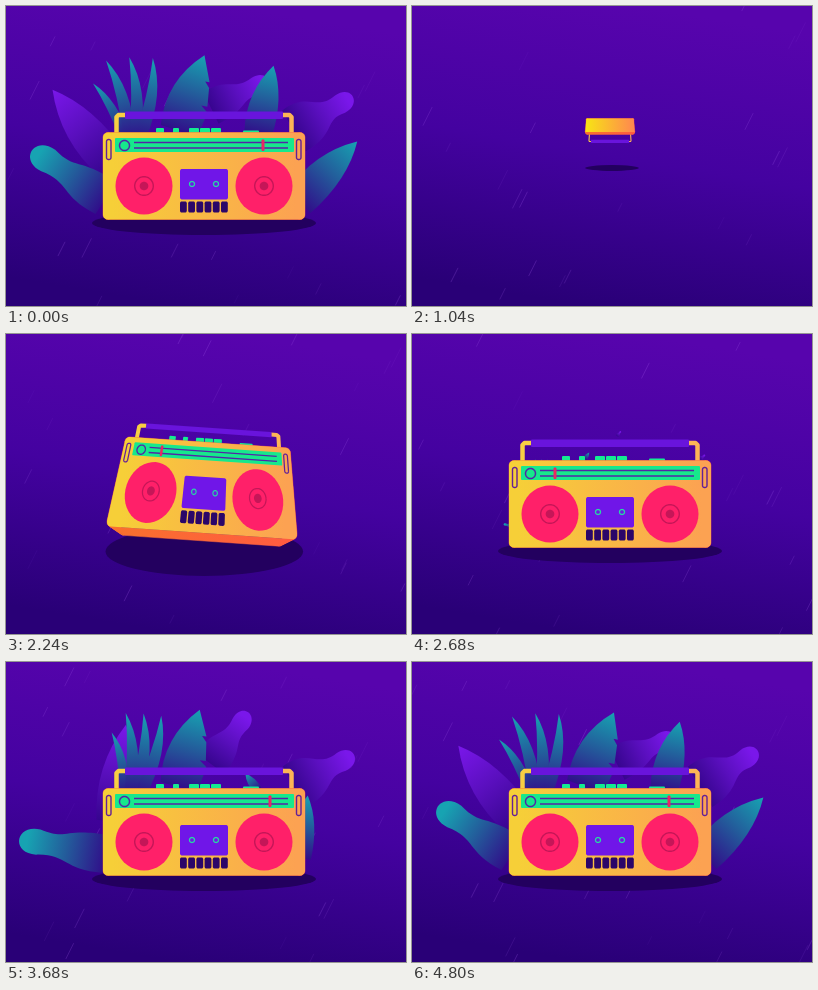
These frames come from a looping animation (400 by 300 pixels, 4840 ms). An HTML page with a canvas:

```html
<!DOCTYPE html>
<html lang="en">
<head>
<meta charset="utf-8">
<title>Boombox</title>
<style>
html, body { margin: 0; width: 100%; height: 100%; overflow: hidden; background: #4202a0; }
canvas { display: block; width: 400px; height: 300px; }
</style>
</head>
<body>
<canvas id="stage" width="400" height="300"></canvas>
<script>
const ctx = document.getElementById('stage').getContext('2d');
const LOOP = 4840, FOCAL = 200, HALF = 18, MID = { x: 198, y: 169.5 };
const TEAL = ['#17a3b2', '#235c9b', '#300f8a'];
const PURPLE = ['#7a17ea', '#5a0fbe', '#37058f'];
const { sin, cos, PI } = Math, TURN = PI * 2;

function ease(t, from, to) {
  const u = Math.min(1, Math.max(0, (t - from) / (to - from)));
  return u * u * (3 - 2 * u);
}
const swing = (t, period) => .5 - .5 * cos(TURN * (t - 3680) / period);
const slowSway = t => swing(t, t < 3680 ? 1120 : 2240);
const quickSway = t => swing(t, 1280);

// Angles are degrees clockwise from upright; lean is added at full sway.
const plants = [
  { kind: 'blob', colors: PURPLE, width: .3, x: 205, y: 102, length: 58, angle: 36, lean: 28 },
  { kind: 'blob', colors: PURPLE, width: .38, x: 288, y: 125, length: 62, angle: 62, lean: -27, sway: quickSway },
  { kind: 'leaf', colors: PURPLE, width: .18, x: 108, y: 160, length: 98, angle: 7, lean: -60 + 14 },
  { kind: 'blob', colors: TEAL, width: .24, x: 100, y: 192, length: 80, angle: -80, lean: 23 }
];
plants[2].lean = -60;
plants[2].lean = -46;
for (let i = 0; i < 4; i++) {
  plants.push({ kind: 'leaf', colors: TEAL, width: .07, bend: .12, x: 119 + 5 * i, y: 133,
    length: i ? 82 : 64, angle: -12 + 9 * i, lean: -18 + 4 * i });
}
plants.push(
  { kind: 'torn', colors: TEAL, width: .24, x: 173, y: 125, length: 80, angle: 15, lean: 43, sway: quickSway },
  { kind: 'leaf', colors: TEAL, width: .2, x: 252, y: 128, length: 70, angle: -37, lean: 50, shrink: .7 },
  { kind: 'leaf', colors: TEAL, width: .19, x: 293, y: 196, length: 84, angle: 8, lean: 36, shrink: .25 }
);

function drawPlant(plant, t) {
  const { kind, colors, width: w, x, y, bend = 0, shrink = 0, sway = slowSway } = plant;
  const s = sway(t < 1000 ? t + LOOP : t);
  const grown = 1 - ease(t, 0, 520) + ease(t, 2600, 3020);
  const length = plant.length * grown * (1 - shrink * (1 - s) ** 2);
  if (length < 2) return;
  const angle = (plant.angle + plant.lean * s) * PI / 180;
  const dx = length * sin(angle), dy = -length * cos(angle);
  const at = (u, v) => [x + dx * u - dy * v, y + dy * u + dx * v];

  const fill = ctx.createLinearGradient(x + dx, y + dy, x, y);
  colors.forEach((c, i) => fill.addColorStop(i / 2, c));
  ctx.fillStyle = fill;
  ctx.beginPath();
  ctx.moveTo(...at(0, -w));
  if (kind === 'blob') {
    const head = .16, neck = .08;
    ctx.bezierCurveTo(...at(.5, -w * 1.2), ...at(.48, -neck), ...at(.86, -head));
    ctx.bezierCurveTo(...at(1.18, -head * 1.2), ...at(1.18, head * 1.1), ...at(.86, head));
    ctx.bezierCurveTo(...at(.5, neck), ...at(.58, w), ...at(0, w));
  } else {
    ctx.quadraticCurveTo(...at(.55, bend - w * 1.5), ...at(1, 0));
    if (kind === 'torn') {
      for (const u of [.7, .4]) {
        const edge = w * (1.4 - u);
        ctx.lineTo(...at(u, edge));
        ctx.lineTo(...at(u - .01, edge * .68));
        ctx.lineTo(...at(u - .07, edge * 1.1));
      }
      ctx.lineTo(...at(0, w));
    } else ctx.quadraticCurveTo(...at(.6, bend + w * 1.25), ...at(0, w));
  }
  ctx.fill();
}

let seed = 41;
const random = () => (seed = seed * 16807 % 2147483647) / 2147483647;
const drops = Array.from({ length: 40 }, () => ({
  x: random() * 550, phase: random(), cycles: 4 + Math.floor(random() * 3),
  length: 8 + random() * 12, alpha: .06 + random() * .24
}));

function drawRain(t) {
  ctx.strokeStyle = '#ac66ef';
  ctx.lineWidth = .8;
  for (const d of drops) {
    const y = (d.phase + d.cycles * t / LOOP) % 1 * 350 - 25;
    const x = d.x - y * .5;
    ctx.globalAlpha = d.alpha;
    ctx.beginPath();
    ctx.moveTo(x, y);
    ctx.lineTo(x - d.length * .5, y + d.length);
    ctx.stroke();
  }
  ctx.globalAlpha = 1;
}

function arc(x, y, r, from = 0, to = TURN, steps = 40) {
  return Array.from({ length: steps + 1 }, (_, i) => {
    const a = from + (to - from) * i / steps;
    return [x + r * cos(a), y + r * sin(a)];
  });
}
function rounded(x0, y0, x1, y1, r) {
  const q = PI / 2;
  return [[x1 - r, y1 - r], [x0 + r, y1 - r], [x0 + r, y0 + r], [x1 - r, y0 + r]]
    .flatMap(([x, y], i) => arc(x, y, r, i * q, (i + 1) * q, 5));
}

// The box tumbles into the distance and back, with a kick near the ground.
function poseAt(t) {
  const away = ease(t, 400, 1040) - ease(t, 1040, 2640);
  const kick = 4.2 * away * (1 - away) ** 4;
  return {
    away, kick,
    scale: 1 - .76 * away,
    y: MID.y - 49 * away - 10 * sin(PI * away),
    tilt: (t < 1040 ? 360 - 155 * away : 205 * away ** 1.2) * PI / 180,
    roll: 12 * kick * PI / 180,
    stretch: 1 - .28 * away + kick,
    handle: 18 + 28 * away ** 2 - 13 * kick
  };
}

function projector({ kick, scale, y: cy, tilt, roll, stretch }) {
  const focal = FOCAL / scale, cx = MID.x + 2 * scale * kick;
  return (x, y, z) => {
    x -= MID.x;
    y -= MID.y;
    const depth = y * sin(tilt) + z * cos(tilt);
    const k = scale * (focal - HALF) / (focal - depth);
    const px = x * k, py = (y * cos(tilt) - z * sin(tilt)) * k * stretch;
    return [cx + px * cos(roll) - py * sin(roll), cy + px * sin(roll) + py * cos(roll)];
  };
}

function drawShadow({ away, kick, scale }) {
  ctx.fillStyle = '#23005f';
  ctx.beginPath();
  ctx.ellipse(MID.x + 2 * away, 217 - 55 * away + 27 * kick, 112 * scale, 12 * scale + 42 * kick, 0, 0, TURN);
  ctx.fill();
}

function drawBox(pose, t) {
  const project = projector(pose), { scale, handle } = pose;
  const path = (points, z) => {
    ctx.beginPath();
    points.forEach(([x, y]) => ctx.lineTo(...project(x, y, z)));
  };
  const fill = (points, color, z = HALF) => {
    path(points, z);
    ctx.closePath();
    ctx.fillStyle = color;
    ctx.fill();
  };
  const line = (points, color, width) => {
    path(points, HALF);
    ctx.strokeStyle = color;
    ctx.lineWidth = width * scale;
    ctx.stroke();
  };
  const across = (left, right) => {
    const g = ctx.createLinearGradient(...project(97, 170, 0), ...project(299, 170, 0));
    g.addColorStop(0, left);
    g.addColorStop(1, right);
    return g;
  };

  const outline = rounded(97, 126.5, 299, 213.5, 5);
  const front = outline.map(([x, y]) => project(x, y, HALF));
  const back = outline.map(([x, y]) => project(x, y, -HALF));
  const area = pts => pts.reduce((sum, [x, y], i) => {
    const [nx, ny] = pts[(i + 1) % pts.length];
    return sum + x * ny - nx * y;
  }, 0);
  const facing = area(front) > 0, away = area(back) < 0;

  const top = 126 - handle, unit = handle / 18;
  ctx.lineJoin = 'round';
  for (const [x, dir, color] of [[110.5, 1, '#f8cf43'], [285.5, -1, '#fdb456']]) {
    line([[x, 128], [x, top + 3 * unit], [x + 2 * dir, top + unit], [x + 9 * dir, top + unit]], color, 4.5);
  }
  fill(rounded(119, top - 2.5 * unit, 277, top + 5 * unit, 1), '#6914dc');
  if (facing) {
    for (const [x, w, y] of [[150, 8, 122], [167, 6, 122], [183, 10, 122],
      [194, 10, 122], [205, 10, 122], [237, 16, 124.5]])
      fill(rounded(x, y, x + w, 129, 1), '#14ec91');
  }

  ctx.fillStyle = ctx.strokeStyle = across('#f9702e', '#ff5c40');
  ctx.lineWidth = .5;
  front.forEach((p, i) => {
    const n = (i + 1) % front.length;
    ctx.beginPath();
    [p, front[n], back[n], back[i]].forEach(q => ctx.lineTo(...q));
    ctx.closePath();
    ctx.fill();
    ctx.stroke();
  });
  if (away) fill(outline, across('#f7e315', '#ff884f'), -HALF);
  if (!facing) return;

  fill(outline, across('#f6cf38', '#fca252'));
  fill(rounded(109, 132, 288, 146, 1), '#17e88c');
  for (const y of [136.5, 142]) line([[128, y], [282, y]], '#5425a7', 1.5);
  line(arc(118.5, 139.5, 5), '#5425a7', 1.5);
  const needle = 257 - 114 * ease(t, 0, 500) + 121 * ease(t, 3120, 3680) -
    29 * ease(t, 3680, 4320) + 22 * ease(t, 4320, 4800);
  fill(rounded(needle - 1.5, 133.5, needle + 1.5, 145, 1), '#e82862');
  for (const x of [100.5, 290.5]) {
    const slot = rounded(x, 133.5, x + 4.5, 153.5, 2);
    line([...slot, slot[0]], '#642097', 1.4);
  }
  for (const x of [138, 258]) {
    fill(arc(x, 180, 28.5), '#ff2069');
    line(arc(x, 180, 9.3), '#c51658', 1.4);
    fill(arc(x, 180, 4.3), '#c51658');
  }
  fill(rounded(174, 163, 222, 193.5, 2), '#7016e8');
  for (const x of [186, 210]) line(arc(x, 178, 2.5), '#25dba3', 1.3);
  for (let i = 0; i < 6; i++) {
    const x = 174 + i * 8.2;
    fill(rounded(x, 195.5, x + 6.8, 206.5, 1.7), '#2b0669');
  }
}

function draw(t) {
  const sky = ctx.createLinearGradient(225, 0, 175, 300);
  sky.addColorStop(0, '#5704ad');
  sky.addColorStop(.5, '#4402a0');
  sky.addColorStop(1, '#290077');
  ctx.fillStyle = sky;
  ctx.fillRect(0, 0, 400, 300);
  drawRain(t);
  plants.forEach(p => drawPlant(p, t));
  const pose = poseAt(t);
  drawShadow(pose);
  drawBox(pose, t);
}

const start = performance.now();
function frame() {
  draw((performance.now() - start) % LOOP);
  requestAnimationFrame(frame);
}
frame();
</script>
</body>
</html>
```
